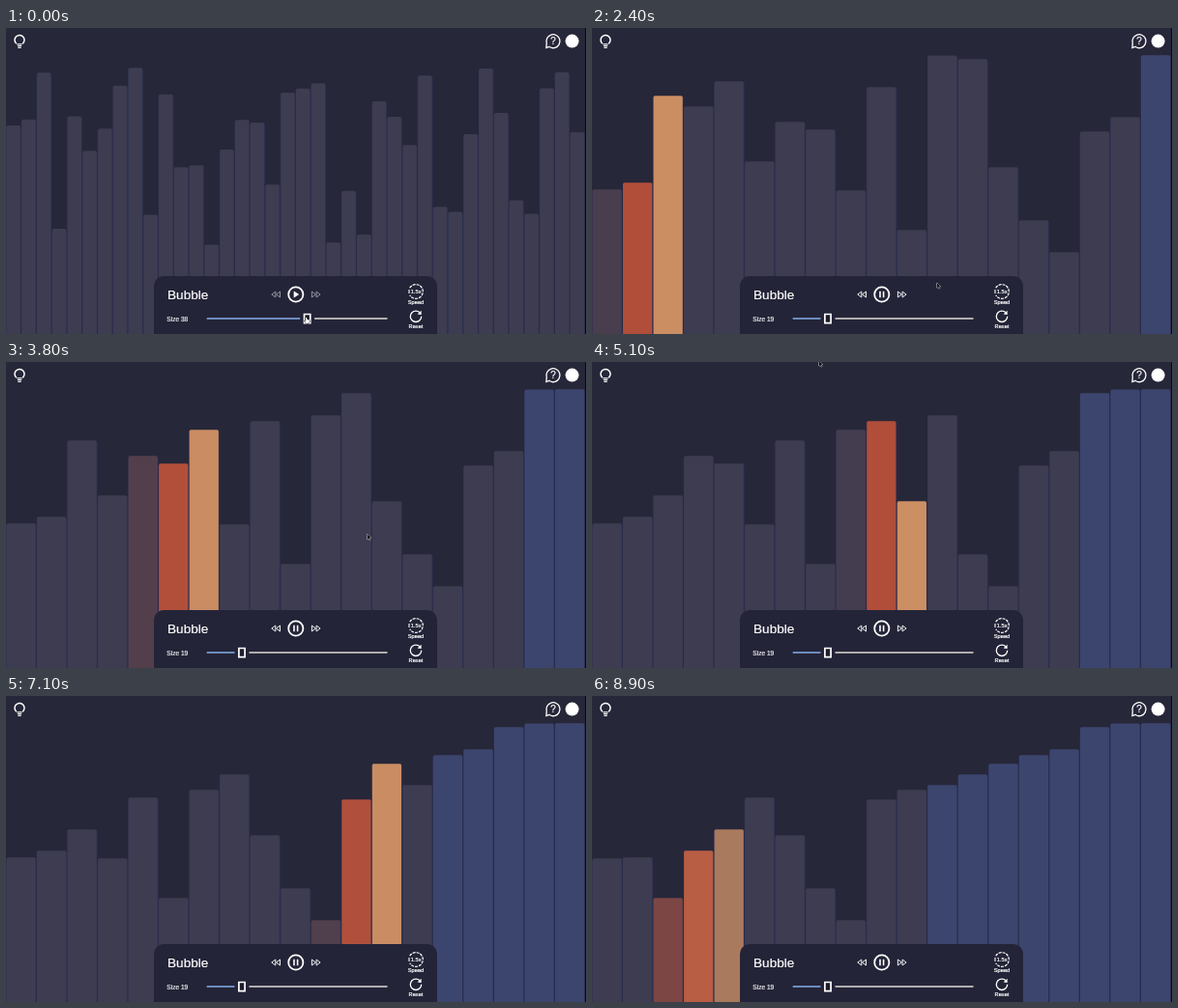
An HTML page with a canvas that plays this animation: 600x317 px, repeating every 9000 ms.

```html
<!DOCTYPE html>
<html lang="en">
<head>
<meta charset="utf-8">
<title>Bubble sort</title>
<style>
  html, body { margin: 0; width: 100%; height: 100%; overflow: hidden; background: #27273a; }
  canvas, svg { position: absolute; left: 0; top: 0; width: 600px; height: 317px; }
  text { font-family: "Liberation Sans", Arial, sans-serif; fill: #fff; stroke: #fff; stroke-width: .2; }
  .mid { text-anchor: middle; font-size: 5.7px; }
</style>
</head>
<body>
<canvas id="stage"></canvas>
<svg viewBox="0 0 600 317">
  <text x="167" y="280.6" font-size="13.6">Bubble</text>
  <text id="size" x="166.3" y="303.5" font-size="6.6" stroke="none" fill-opacity=".9">Size 38</text>
  <text class="mid" x="424" y="286">Speed</text>
  <text class="mid" x="424" y="311.4">Reset</text>
  <text class="mid" x="424.2" y="275">1.5x</text>
  <text x="566" y="17.4" font-size="10" text-anchor="middle">?</text>
</svg>
<script>
const W = 600, H = 317, LOOP = 9000, FRAME = 100, PLAY_AT = 1070;
const BG = '#27273a', PANEL = '#242438', WHITE = '#fff';
const GRAY = [61, 60, 80], RED = [176, 78, 58], ORANGE = [204, 142, 99], BLUE = [60, 69, 110];

// bar tops of the list to sort; a smaller top is a larger value
const LIST = [28.4, 160, 167, 70, 81, 55, 138, 97, 105, 168, 61, 209, 28, 32, 144, 199, 232, 107, 92];
const N = LIST.length, MAX = 2 * N;

// [time, sort step] and [time, x, y]
const TEMPO = [[PLAY_AT, 0], [3800, 40.55], [5100, 60.92], [8900, 119.2]];
const POINTER = [[100, 311, 300], [900, 244, 301], [1400, 259, 306], [2400, 357, 264],
  [3350, 578, 10], [3800, 374, 178.5], [4900, 235, -1]];

const canvas = document.getElementById('stage');
const label = document.getElementById('size');
const ctx = canvas.getContext('2d');
const dpr = window.devicePixelRatio || 1;
canvas.width = W * dpr;
canvas.height = H * dpr;
ctx.scale(dpr, dpr);

const clamp = v => Math.max(0, Math.min(1, v));

function along(keys, t) {
  let i = 1;
  while (i < keys.length - 1 && keys[i][0] < t) i++;
  const a = keys[i - 1], b = keys[i];
  const u = clamp((t - a[0]) / (b[0] - a[0]));
  return a.slice(1).map((v, j) => v + (b[j + 1] - v) * u);
}

function randomTops(n) {
  let seed = n * 7919 + 13;
  return Array.from({ length: n }, () => {
    seed = (seed * 16807) % 2147483647;
    return 28 + 205 * seed / 2147483647;
  });
}

// every comparison of the sort as [pass, index]
const steps = [];
for (let pass = 0; pass < N - 1; pass++)
  for (let i = 0; i < N - 1 - pass; i++) steps.push([pass, i]);

function sortedTo(last) {
  const a = LIST.slice();
  for (const [, i] of steps.slice(0, last + 1))
    if (a[i] < a[i + 1]) [a[i], a[i + 1]] = [a[i + 1], a[i]];
  return a;
}

function barColor(i, k) {
  if (k < 0) return GRAY;
  const [pass, j] = steps[k];
  if (i === j) return RED;
  if (i === j + 1) return ORANGE;
  return i >= N - pass ? BLUE : GRAY;
}

function fadedColor(i, step) {
  const k = Math.floor(step), from = barColor(i, k - 1), to = barColor(i, k);
  const rest = Math.exp(-(step - k) * (to === GRAY ? 3 : 7));
  return to.map((v, c) => v + (from[c] - v) * rest);
}

function bars(tops, color) {
  const pitch = 599 / tops.length;
  tops.forEach((top, i) => {
    const x = i * pitch;
    ctx.fillStyle = '#2c2e52';
    ctx.fillRect(x, top + 1.5, pitch, H);
    ctx.fillStyle = `rgb(${color(i).map(Math.round)})`;
    ctx.beginPath();
    ctx.roundRect(x + .5, top + .2, pitch - 1.3, H, 1.5);
    ctx.fill();
  });
}

function stroke(width, color = WHITE) {
  ctx.lineWidth = width;
  ctx.strokeStyle = color;
  ctx.stroke();
}

function path(points, close) {
  ctx.beginPath();
  points.forEach(p => ctx.lineTo(...p));
  if (close) ctx.closePath();
}

function line(points, width, color, close) {
  path(points, close);
  stroke(width, color);
}

function shape(points, color = WHITE) {
  path(points);
  ctx.fillStyle = color;
  ctx.fill();
}

function ring(x, y, r, width, from = 0, to = 2) {
  ctx.beginPath();
  ctx.arc(x, y, r, from * Math.PI, to * Math.PI);
  stroke(width);
}

function topIcons() {
  // bulb
  ring(14, 12.4, 5, 1.5, .72, 2.28);
  for (let i = 0; i < 3; i++) line([[11.4 + i / 2, 16.8 + i * 1.8], [16.6 - i / 2, 16.8 + i * 1.8]], 1.2);
  // help bubble
  ring(566, 13.7, 7, 1.3, -1.1, .72);
  line([[559.3, 15.8], [558.9, 20.6], [562, 19.4]], 1.3);
  ctx.beginPath();
  ctx.arc(585.6, 13.6, 7, 0, Math.PI * 2);
  ctx.fillStyle = WHITE;
  ctx.fill();
}

function skip(x, dir, color) {
  for (const d of [0, 4.7])
    line([[x + dir * d, 273], [x + dir * (d + 4), 276], [x + dir * d, 279]], 1, color, true);
}

function controls(playing) {
  const side = playing ? '#f0f0f4' : '#92929f';
  skip(283.5, -1, side);
  skip(316.4, 1, side);
  ring(299.8, 276, 7.6, 1.8);
  if (playing) {
    for (const x of [298, 301.6]) line([[x, 272.8], [x, 279.2]], 1.6);
  } else {
    shape([[297.7, 272.6], [303.3, 276], [297.7, 279.4]]);
  }
  // speed dial
  ctx.setLineDash([3, 1]);
  ring(424, 273, 7.3, 1.2, -.83, .83);
  ctx.setLineDash([]);
  line([[417, 271], [417, 275]], 1.1);
  // reset arrow
  ring(424, 298.8, 5.7, 1.3, 0, 1.75);
  shape([[429.6, 292.8], [429.6, 297], [425.6, 296.6]]);
}

function slider(size) {
  const x = 244 + (size - N) * 3.56, left = 207.7, right = 394.5, gap = 7.5;
  ctx.fillStyle = '#6d8cbe';
  ctx.fillRect(left, 300, x - gap - left, 2);
  ctx.fillStyle = '#b0aeae';
  ctx.fillRect(x + gap, 300, right - x - gap, 2);
  ctx.fillStyle = '#1d1d2c';
  ctx.strokeStyle = WHITE;
  ctx.lineWidth = 1.7;
  ctx.beginPath();
  ctx.rect(x - 3.1, 296.5, 6.2, 9.2);
  ctx.fill();
  ctx.stroke();
}

function pointer(t) {
  if (t >= 6500) return;
  const hand = [[-1, 0], [0, 0], [.6, 2], [3, 2.6], [3, 4.6], [2, 6], [-.4, 6], [-2.4, 3.6], [-1, 3.4]];
  const arrow = [[0, 0], [0, 5.2], [1.2, 4.2], [2.2, 6], [2.9, 5.6], [2.1, 3.8], [3.6, 3.6]];
  const [form, edge, fill] = t < 1900 ? [hand, '#16161f', WHITE] : [arrow, '#d0d0d8', '#101018'];
  ctx.save();
  ctx.translate(...along(POINTER, t));
  line(form, 1, edge, true);
  shape(form, fill);
  ctx.restore();
}

function draw(t) {
  const playing = t >= PLAY_AT;
  const size = Math.round(MAX - N * clamp((t - 100) / 800));
  ctx.fillStyle = BG;
  ctx.fillRect(0, 0, W, H);
  if (playing) {
    const step = along(TEMPO, t)[0];
    // values trade places just before the highlight moves on
    bars(sortedTo(Math.floor(step + .15)), i => fadedColor(i, step));
  } else {
    bars(size === N ? LIST : randomTops(size), () => GRAY);
  }
  ctx.fillStyle = '#08080e';
  ctx.fillRect(599, 0, 1, H);
  ctx.fillStyle = PANEL;
  ctx.beginPath();
  ctx.roundRect(153, 257, 293, 80, 10);
  ctx.fill();
  topIcons();
  controls(playing);
  slider(size);
  pointer(t);
  label.textContent = 'Size ' + size;
}

const start = performance.now();
function tick() {
  const t = (performance.now() - start) % LOOP;
  draw(Math.floor(t / FRAME) * FRAME);
  requestAnimationFrame(tick);
}
tick();
</script>
</body>
</html>
```
